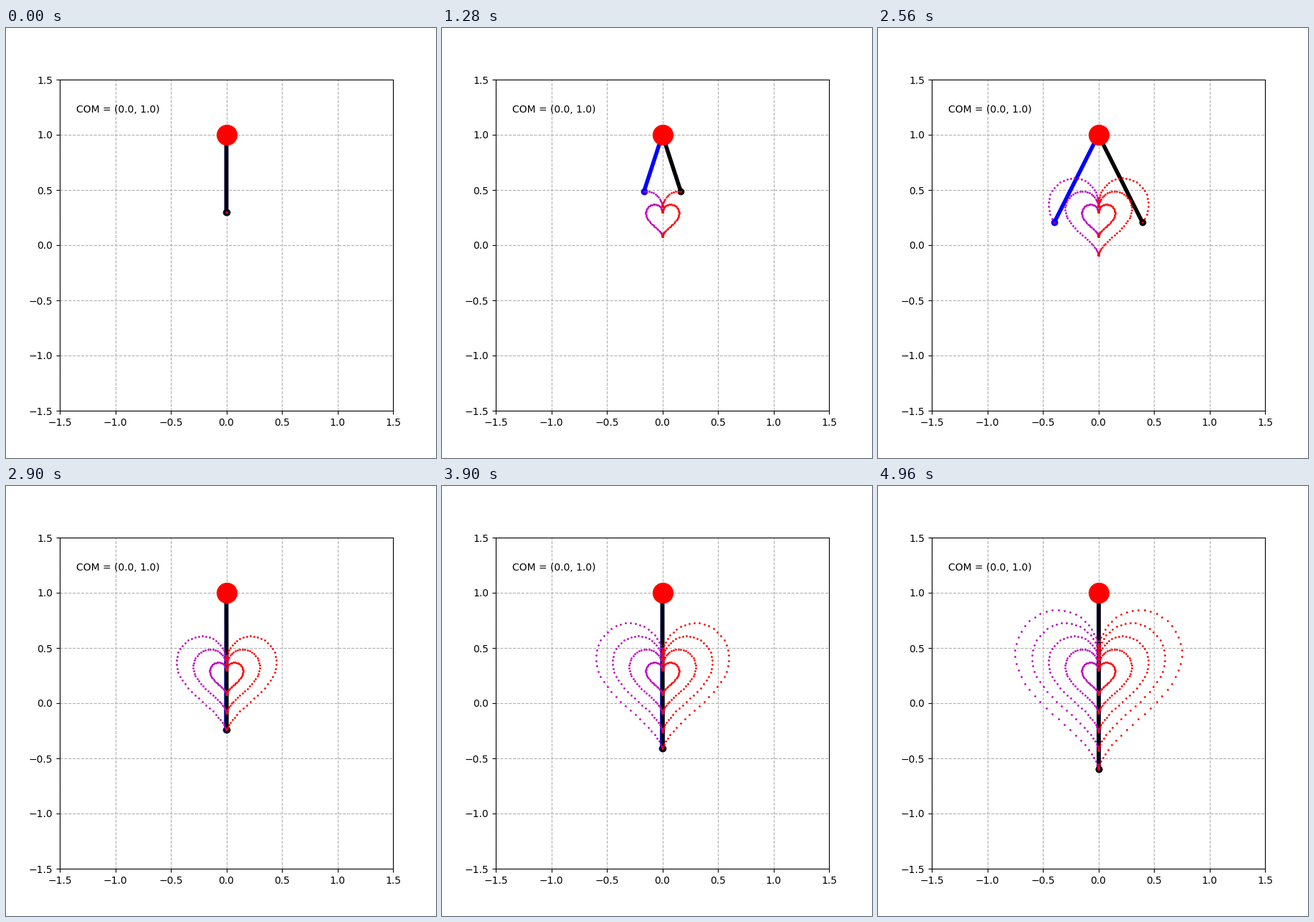
A matplotlib script that plays this animation: 600x600 px, repeating every 4980 ms.

```python
import numpy as np
import matplotlib.pyplot as plt
from matplotlib.animation import FuncAnimation

HEARTS, STEPS = 5, 50
PIVOT = (0.0, 1.0)


def heart_paths():
    """Right halves of the growing hearts, each traced from cusp to tip."""
    t = np.linspace(0, np.pi, STEPS)
    hx = 15 * np.sin(t) ** 3
    hy = 13 * np.cos(t) - 5 * np.cos(2 * t) - 2 * np.cos(3 * t) - np.cos(4 * t)
    size = 0.01 * np.arange(1, HEARTS + 1)[:, None]
    return (size * hx).ravel(), (0.25 + size * hy).ravel()


x, y = heart_paths()

fig, ax = plt.subplots(figsize=(6, 6), dpi=100)
ax.set(xlim=(-1.5, 1.5), ylim=(-1.5, 1.5))
ax.grid(linestyle="--")
ax.text(0.05, 0.9, "COM = (%.1f, %.1f)" % PIVOT, transform=ax.transAxes)

left_rod, = ax.plot([], [], "bo-", lw=4)
right_rod, = ax.plot([], [], "ko-", lw=4)
ax.plot(*PIVOT, "ro", markersize=20)
left_trail, = ax.plot([], [], "m.", markersize=2)
right_trail, = ax.plot([], [], "r.", markersize=2)


def update(frame):
    i = frame + 1
    for side, rod, trail in ((-1, left_rod, left_trail),
                             (1, right_rod, right_trail)):
        rod.set_data([PIVOT[0], side * x[i]], [PIVOT[1], y[i]])
        trail.set_data(side * x[:i + 1], y[:i + 1])
    return left_rod, right_rod, left_trail, right_trail


anim = FuncAnimation(fig, update, frames=HEARTS * STEPS - 1, interval=20,
                     repeat=True, repeat_delay=0)
plt.show()
```
